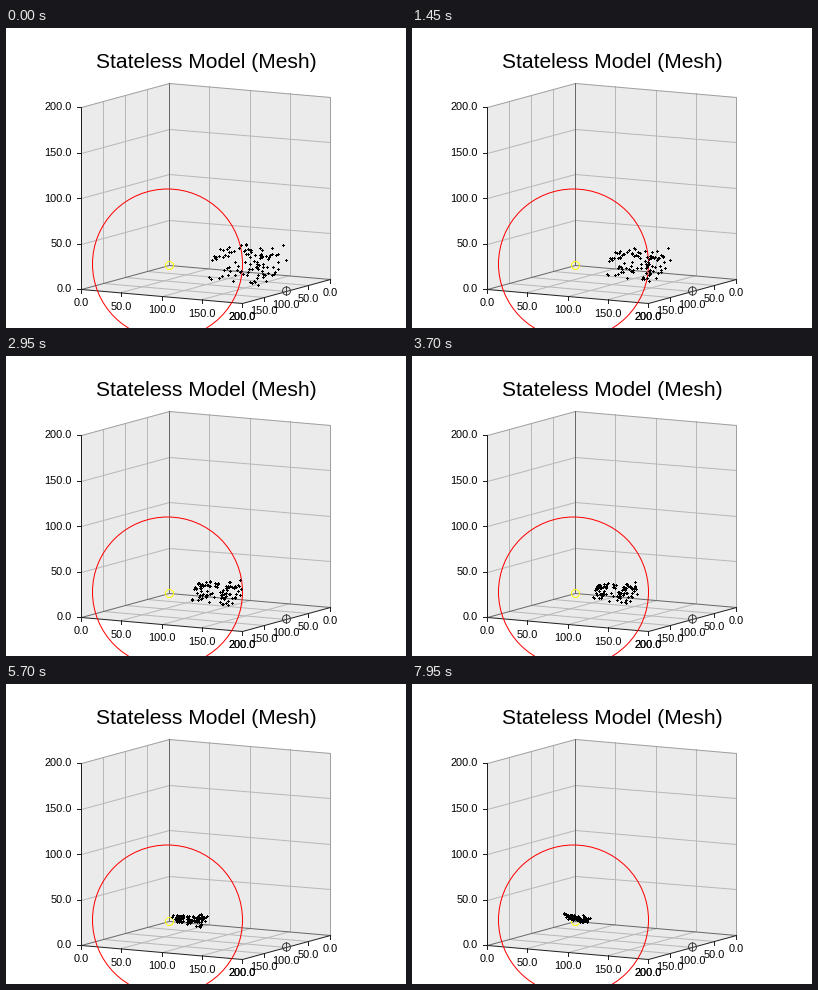
Write a matplotlib script that moves like this. It is 400 px wide and 300 px high and loops after 8 s.

```python
import math
import numpy as np
import matplotlib.pyplot as plt
from matplotlib.animation import FuncAnimation
from matplotlib.patches import Circle, Polygon

W, H, DPI = 400, 300, 100
PX = 72 / DPI
FRAMES, STEP = 160, 50
SIZE = 200            # length of each axis in world units
COUNT = 100
SPEED = 21.5          # world units per second
SOFT = 20             # how gently a particle settles at the goal
DARK, EDGE, BACK, GRID = "#202020", "#a0a0a0", "#686868", "#b8b8b8"

plt.rcParams["font.family"] = "Liberation Sans"
fig = plt.figure(figsize=(W / DPI, H / DPI), dpi=DPI, facecolor="white")
ax = fig.add_axes([0, 0, 1, 1])
ax.set_xlim(0, W)
ax.set_ylim(H, 0)
ax.axis("off")


def project(x, y, z):
    return 163.5 + 0.805 * x - 0.44 * y, 237.5 + 0.068 * x + 0.12 * y - 0.91 * z


def line(p, q, color, z=2):
    xs, ys = ([math.floor(v) + 0.5 for v in pair] for pair in zip(p, q))
    ax.plot(xs, ys, color=color, lw=PX, zorder=z, snap=False,
            solid_capstyle="projecting")


def edge(a, b, color, z=2):
    line(project(*a), project(*b), color, z)


def label(x, y, text, size=11, ha="center"):
    ax.text(x, y, text, fontsize=size * PX, ha=ha, va="center_baseline",
            color="black", zorder=6)


def ring(x, y, r, color):
    ax.add_patch(Circle((x, y), r, fill=False, ec=color, lw=PX, zorder=4))


def point(i, u, j, v):
    """World point with coordinate i set to u and coordinate j set to v."""
    p = [0, 0, 0]
    p[i], p[j] = u, v
    return p


def draw_plane(i, j):
    corners = [(0, 0), (SIZE, 0), (SIZE, SIZE), (0, SIZE)]
    ax.add_patch(Polygon([project(*point(i, u, j, v)) for u, v in corners],
                         fc="#ebebeb", ec="none", zorder=1))
    for v in range(50, SIZE, 50):
        edge(point(i, v, j, 0), point(i, v, j, SIZE), GRID)
        edge(point(i, 0, j, v), point(i, SIZE, j, v), GRID)


def draw_box():
    m = SIZE
    for i, j in ((0, 1), (0, 2), (1, 2)):
        draw_plane(i, j)
    edge((0, 0, m), (m, 0, m), EDGE)
    edge((0, 0, m), (0, m, m), EDGE)
    edge((m, 0, 0), (m, 0, m), EDGE)
    for end in ((m, 0, 0), (0, m, 0), (0, 0, m)):
        edge((0, 0, 0), end, BACK)
    edge((0, m, 0), (0, m, m), DARK, 3)
    edge((0, m, 0), (m, m, 0), DARK, 3)
    edge((m, m, 0), (m, 0, 0), DARK, 3)

    for v in range(0, m + 1, 50):
        text = f"{v:.1f}"
        x, y = project(0, m, v)
        line((x - 4, y), (x, y), DARK, 3)
        label(x - 10, y - 1, text, ha="right")
        for x, y in (project(v, m, 0), project(m, v, 0)):
            line((x, y), (x, y + 4), DARK, 3)
            label(x - 0.5, y + 13, text)


rng = np.random.default_rng(12)
start = rng.uniform((100, 30, 3), (170, 100, 40), (COUNT, 3))
drift = rng.uniform(0.15, 1, COUNT)
spread = rng.uniform((-1.5, -2.4), (1.5, 2.4), (COUNT, 2))
goal = np.array([0, 0, 3])
dist = np.linalg.norm(start - goal, axis=1)
heading = (start - goal) / dist[:, None]


def swarm_at(t):
    left = dist - SPEED * t
    soft = SOFT * np.logaddexp(0, left / SOFT)
    x, y = project(*(goal + heading * soft[:, None]).T)
    # early arrivals drift past the goal, the rest crowd in behind them
    past = np.clip(-left / 36, 0, 1) * drift
    near = np.clip(1 - left / 40, 0, 1)
    x += spread[:, 0] * near - 13 * past
    y += spread[:, 1] * near - 4.5 * past
    return np.floor(x) + 0.5, np.floor(y) + 0.5


draw_box()
label(200.5, 33, "Stateless Model (Mesh)", 21)
ring(161.5, 236, 75, "#ff0000")
ring(163.5, 237.5, 4, "#ffff00")
ring(280.5, 263, 4, "#404040")
line((280.5, 258), (280.5, 267), "#404040", 4)

dots, = ax.plot([], [], "P", ms=3 * PX, mfc="black", mew=0, ls="none",
                antialiased=False, zorder=5)


def update(i):
    dots.set_data(*swarm_at(i * STEP / 1000))
    return dots,


anim = FuncAnimation(fig, update, frames=FRAMES, interval=STEP,
                     init_func=lambda: update(0), repeat=True,
                     repeat_delay=0, blit=False)
plt.show()
```
